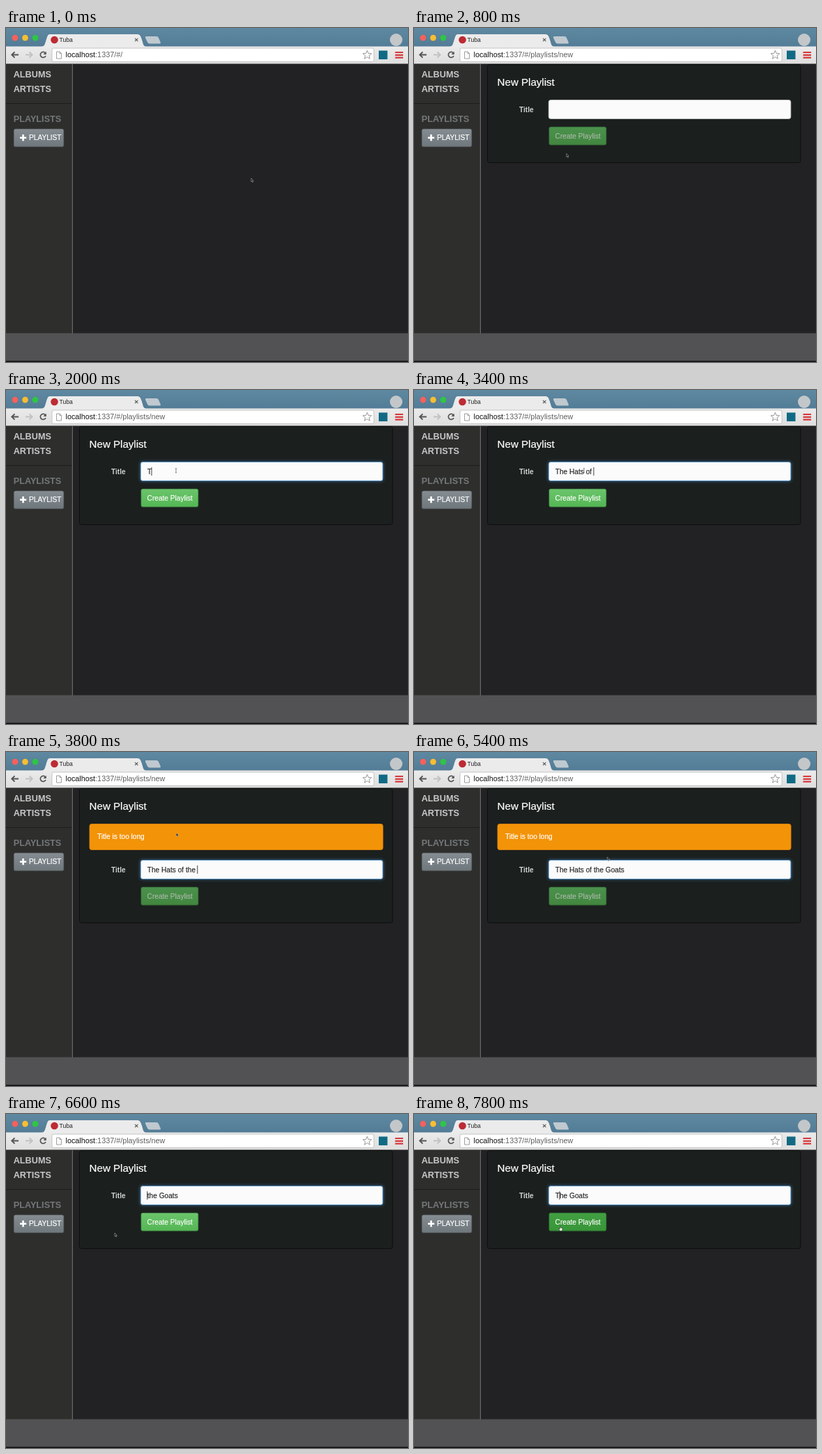
Recreate the animation shown at these times as an HTML page. Size 577x480 px, loop 8 s.

```html
<!DOCTYPE html>
<html lang="en">
<head>
<meta charset="utf-8">
<title>New Playlist</title>
<style>
  html, body { margin: 0; width: 100%; height: 100%; overflow: hidden; background: #222224; }
  svg { display: block; position: absolute; left: 0; top: 0; }
  text { font: 10.15px "Liberation Sans", Arial, sans-serif; white-space: pre; }
  .nav { font-size: 12.7px; font-weight: bold; fill: #c6c7c8; }
  .url { font-size: 10.8px; fill: #606060; }
  .firm { fill: #fff; stroke: #fff; stroke-width: .2; }
</style>
</head>
<body>
<svg width="577" height="480" viewBox="0 0 577 480">
  <defs>
    <linearGradient id="sky" x2="0" y2="1"><stop stop-color="#5f88a1"/><stop offset="1" stop-color="#527b95"/></linearGradient>
    <linearGradient id="bar" x2="0" y2="1"><stop stop-color="#ebebeb"/><stop offset="1" stop-color="#dedede"/></linearGradient>
    <linearGradient id="grey" x2="0" y2="1"><stop stop-color="#858d92"/><stop offset="1" stop-color="#6e777c"/></linearGradient>
    <linearGradient id="greyHover" x2="0" y2="1"><stop stop-color="#697176"/><stop offset="1" stop-color="#596166"/></linearGradient>
    <linearGradient id="on" x2="0" y2="1"><stop stop-color="#6cc56c"/><stop offset="1" stop-color="#54b654"/></linearGradient>
    <linearGradient id="off" x2="0" y2="1"><stop stop-color="#4b924d"/><stop offset="1" stop-color="#42863f"/></linearGradient>
    <linearGradient id="hover" x2="0" y2="1"><stop stop-color="#429f42"/><stop offset="1" stop-color="#379637"/></linearGradient>
    <filter id="soft" x="-5%" y="-40%" width="110%" height="180%"><feGaussianBlur stdDeviation="2.2"/></filter>
  </defs>

  <!-- browser -->
  <rect width="577" height="28" fill="url(#sky)"/>
  <circle cx="13" cy="14.100" r="4.300" fill="#f9605a"/>
  <circle cx="27.500" cy="14.100" r="4.300" fill="#f8be32"/>
  <circle cx="42" cy="14.100" r="4.300" fill="#2ec644"/>
  <rect y="26.500" width="577" height="24.500" fill="url(#bar)"/>
  <path d="M51 27C56 26 56 22 58 16C60 10 60 9 64 9H188C192.500 9 192.800 11 194.800 16C196.800 22 196.500 26 201.500 27Z" fill="#ebebeb"/>
  <path d="M201 12H216Q218 12 219 14L222 21Q222 22.500 220.500 22.500H206Q204 22.500 203 20.500L200 14Q199.500 12 201 12Z" fill="#bfc9cf"/>
  <circle cx="69.500" cy="17" r="5.300" fill="#bd2b33"/>
  <text x="76.500" y="20.300" style="font-size:8.6px" fill="#222">Tuba</text>
  <path d="M185 14.800l4.400 4.400m0-4.400l-4.400 4.400" stroke="#555" stroke-width="1.100"/>
  <circle cx="560" cy="17" r="9" fill="#c3c7c9"/>
  <g fill="none" stroke-width="1.900">
    <path d="M18 38.500H8.500M12.500 34.300L8.300 38.500L12.500 42.700" stroke="#555"/>
    <path d="M28 38.500H37.500M33.500 34.300L37.700 38.500L33.500 42.700" stroke="#c2c2c2"/>
    <path d="M56.500 36A4 4 0 1 0 57 40" stroke="#555" stroke-width="1.700"/>
  </g>
  <path d="M57.800 33.800V38H53.500Z" fill="#555"/>
  <rect x="66" y="29" width="462" height="19.500" rx="2" fill="#fff" stroke="#b9b9b9" stroke-width=".8"/>
  <path d="M72.500 34H77L79.500 36.500V44H72.500ZM77 34V36.500H79.500" fill="#fafafa" stroke="#8b8b8b" stroke-width=".8"/>
  <text class="url" x="85.500" y="42.300"><tspan fill="#111">localhost</tspan><tspan id="path">:1337/#/</tspan></text>
  <path id="star" fill="#fff" stroke="#8c8c8c" stroke-width=".9"/>
  <rect x="535" y="32.500" width="12.500" height="12.500" fill="#116a84"/>
  <path d="M558.500 35H570M558.500 38.800H570M558.500 42.600H570" stroke="#d8393c" stroke-width="2.200"/>

  <!-- page -->
  <rect y="51" width="577" height="389" fill="#222224"/>
  <rect y="51" width="95" height="389" fill="#2e2e2c"/>
  <rect y="51" width="577" height="1" fill="#707070"/>
  <rect y="108" width="95" height="1" fill="#1d1d1c"/>
  <rect x="94.800" y="52" width="1.200" height="387" fill="#6a6a6b"/>
  <text class="nav" x="10.700" y="70.600">ALBUMS</text>
  <text class="nav" x="10.700" y="91.500">ARTISTS</text>
  <text class="nav" x="10.700" y="134.800" style="fill:#72777a">PLAYLISTS</text>
  <rect id="add" x="11.200" y="145" width="71.700" height="25.800" rx="2.500" stroke="#4d5356" stroke-width=".6"/>
  <path d="M20 157.700H29.200M24.600 153.100V162.300" stroke="#fff" stroke-width="2.600"/>
  <text class="firm" x="33" y="161.300">PLAYLIST</text>
  <rect y="438.600" width="577" height="40" fill="#525254"/>
  <rect y="478.500" width="577" height="1.500" fill="#110e14"/>

  <!-- form -->
  <g id="form">
    <rect id="panel" x="105.500" y="52.500" width="449.300" height="141" rx="3" fill="#1b1f1e" stroke="#0d0e0e"/>
    <text class="firm" x="119.600" y="83" style="font-size:15.1px">New Playlist</text>
    <g id="alert">
      <rect x="120" y="103.500" width="421" height="37" rx="3" fill="#f39307" stroke="#e88a0c" stroke-width=".8"/>
      <text class="firm" x="131" y="125.400">Title is too long</text>
    </g>
    <g id="row">
      <text x="151" y="120.500" fill="#d0d2d2" style="font-weight:bold">Title</text>
      <rect id="glow" x="192" y="102.500" width="350" height="29" rx="4" fill="#3b78a8" filter="url(#soft)"/>
      <rect id="field" x="193.300" y="103.500" width="347.500" height="27" rx="3" fill="#fbfbfc" stroke-width=".8"/>
      <rect id="mark" y="110.500" height="13" fill="#b4d5fe"/>
      <text id="value" x="202.800" y="120.600" fill="#1c1c1c" stroke="#1c1c1c" stroke-width=".12"></text>
      <rect id="caret" y="111" width=".8" height="12" fill="#111"/>
      <rect id="button" x="193.700" y="142" width="82.400" height="26.200" rx="2.500" stroke="#24482a" stroke-width=".7"/>
      <text id="label" x="202.600" y="158.800" stroke-width=".15">Create Playlist</text>
    </g>
  </g>

  <!-- pointers, placed by their hot spot -->
  <g id="arrow"><path d="M.4.4V5.300L1.500 4.400L2.300 6.200L3 5.900L2.300 4.100L3.700 4Z" fill="#111" stroke="#bbb" stroke-width=".55"/></g>
  <g id="hand"><path d="M-1-3H0V-.5L2.500.2V2.500L1.700 4H-1L-2.500 1V.3L-1 1Z" fill="#fff" stroke="#222" stroke-width=".5"/></g>
  <g id="beam"><path d="M-1-3H1M0-3V3M-1 3H1" fill="none" stroke="#555" stroke-width=".7"/></g>
</svg>
<script>
const LOOP = 8000, STEP = 200, MAX = 15;
const FULL = 'The Hats of the Goats', CUT = 12, TEXT_X = 202.8;
const OPEN = 600, FOCUS = 1400, DRAG = 5600, DELETE = 6600;

const $ = id => document.getElementById(id);
const set = (id, attrs) => { for (const k in attrs) $(id).setAttribute(k, attrs[k]); };
const show = (id, on) => set(id, { display: on ? 'inline' : 'none' });

// time, x, y
const route = [
  [0, 351.5, 215.5], [400, 60, 160], [600, 60, 160], [800, 218.5, 180], [1200, 244, 115.8],
  [5000, 244, 115.8], [5400, 277, 150.5], [5600, 258, 169], [6200, 182, 171],
  [6400, 155.7, 170.5], [7200, 155.7, 170.5], [7400, 180, 175], [7600, 204, 167], [7800, 210.5, 164]
];
// time, letters typed
const typing = [[1800, 0], [2000, 1], [2400, 5], [3400, 12], [3600, 12], [3800, 16], [4000, 16], [4800, 21]];
const blinks = [[0, false], [FOCUS, true], [1800, false], [2000, true], [5200, false], [DELETE, true]];

const held = (track, t) => track.filter(k => k[0] <= t).pop();

function between(track, t) {
  const a = held(track, t) || track[0], b = track.find(k => k[0] > t) || a;
  const p = a === b ? 0 : Math.max(0, (t - a[0]) / (b[0] - a[0]));
  return a.slice(1).map((v, i) => v + (b[i + 1] - v) * p);
}

function textAt(t) {
  if (t < DELETE) return FULL.slice(0, Math.round(between(typing, t)[0]));
  const rest = FULL.slice(CUT);
  return t < 7000 ? rest : (t < 7200 ? '' : 'T') + rest.slice(1);
}

function offset(n) {
  const len = $('value').textContent.length;
  return n > 0 && len ? $('value').getSubStringLength(0, Math.min(n, len)) : 0;
}

function drawMark(t, mx) {
  let from = CUT;
  if (t >= DRAG && t < DELETE) while (from > 0 && TEXT_X + offset(from) > mx + 1) from--;
  show('mark', from < CUT);
  set('mark', { x: TEXT_X + offset(from), width: offset(CUT) - offset(from) });
}

function draw(t) {
  const [mx, my] = between(route, t), text = textAt(t);
  const open = t >= OPEN, long = text.length > MAX, ready = text && !long;
  const shift = long ? 52 : 0;
  const inside = (x, y, w, h) => mx >= x && mx <= x + w && my >= y && my <= y + h;

  const onAdd = inside(11, 145, 72, 26);
  const onButton = open && ready && inside(193, 142 + shift, 83, 27);
  const onField = open && inside(193, 103 + shift, 348, 28);

  $('path').textContent = ':1337/#/' + (open ? 'playlists/new' : '');
  set('add', { fill: onAdd ? 'url(#greyHover)' : 'url(#grey)' });
  show('form', open);
  show('alert', long);
  set('panel', { height: 141 + shift });
  set('row', { transform: `translate(0 ${shift})` });

  const focus = Math.min(1, Math.max(0, (t - FOCUS + 100) / 200));
  set('glow', { opacity: focus * .6 });
  set('field', { stroke: focus ? '#5796c8' : '#c8cccc' });
  $('value').textContent = text;
  show('caret', held(blinks, t)[1]);
  set('caret', { x: TEXT_X - .4 + offset(t < DELETE ? text.length : t < 7200 ? 0 : 1) });
  drawMark(t, mx);

  set('button', { fill: `url(#${!ready ? 'off' : onButton ? 'hover' : 'on'})` });
  const ink = ready ? '#fff' : '#a9b8a9';
  set('label', { fill: ink, stroke: ink });

  const kind = onAdd || onButton ? 'hand' : onField ? 'beam' : 'arrow';
  for (const id of ['arrow', 'hand', 'beam']) show(id, id === kind);
  set(kind, { transform: `translate(${mx} ${my})` });
}

let points = '';
for (let i = 0; i < 10; i++) {
  const a = i * Math.PI / 5 - Math.PI / 2, r = i % 2 ? 2.9 : 6.6;
  points += (i ? 'L' : 'M') + (518.4 + r * Math.cos(a)) + ' ' + (38.8 + r * Math.sin(a));
}
set('star', { d: points + 'Z' });

let last = -1;
function tick() {
  const t = Math.floor(performance.now() % LOOP / STEP) * STEP;
  if (t !== last) draw(last = t);
  requestAnimationFrame(tick);
}
tick();
</script>
</body>
</html>
```
